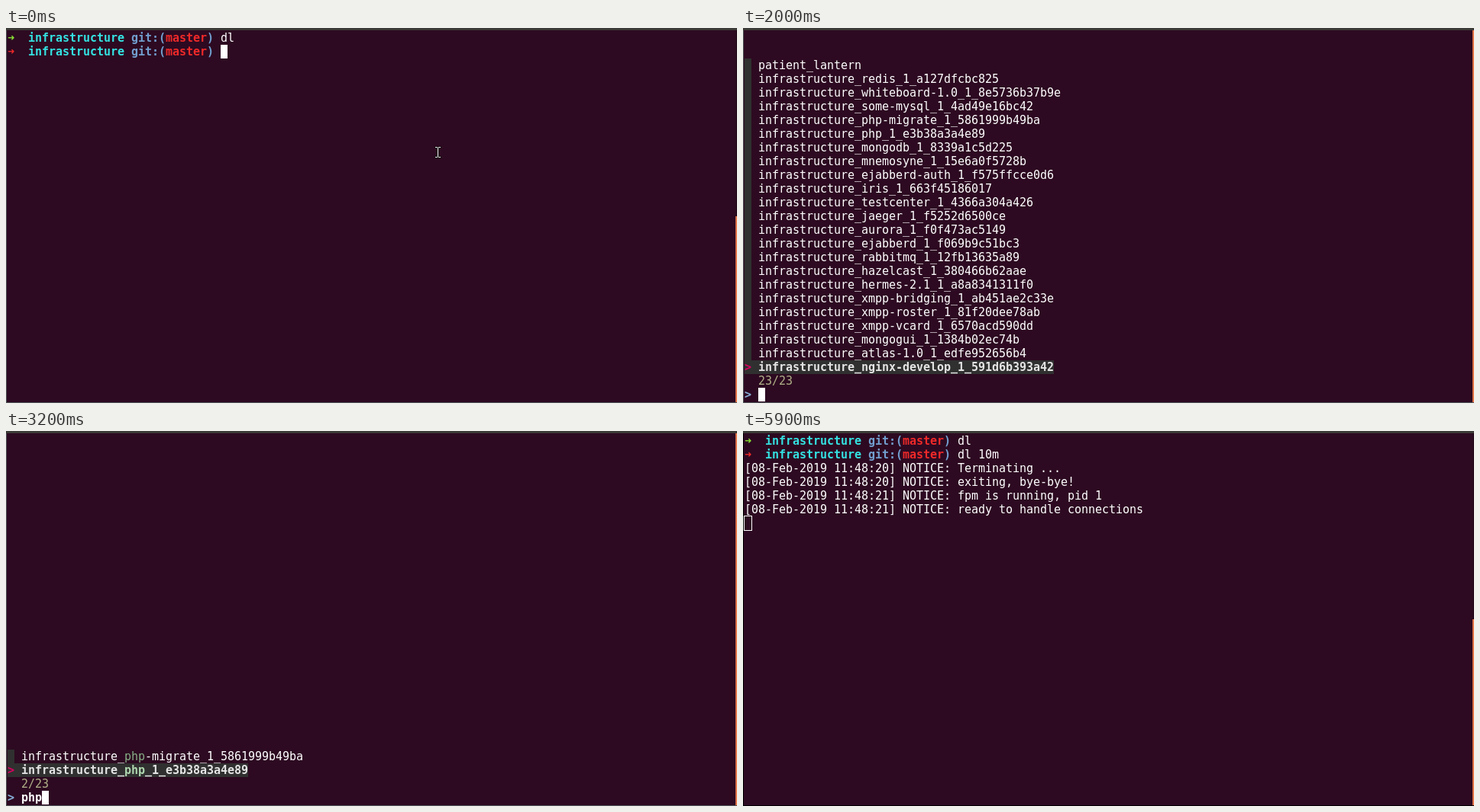
Recreate the animation shown at these times as an HTML page with a canvas. Size 957 by 492 pixels, loop 7.7 s.

```html
<!DOCTYPE html>
<html lang="en">
<head>
<meta charset="utf-8">
<title>Terminal session</title>
<style>
  html, body { margin: 0; width: 100%; height: 100%; overflow: hidden; background: #2d0a21; }
  canvas { display: block; }
</style>
</head>
<body>
<canvas id="stage" width="957" height="492"></canvas>
<script>
const ctx = document.getElementById('stage').getContext('2d');
const LOOP = 7700;
const CELL = 9, LINE = 18, LEFT = 2, TOP = 4, ASCENT = 14;
const FONT = '15px "DejaVu Sans Mono", "DejaVu Sans", monospace';
const C = {
  bg: '#2d0a21', white: '#ffffff', green: '#8ae234', red: '#ef2929', cyan: '#34e2e2',
  blue: '#729fcf', row: '#303030', marker: '#d7005f', current: '#e4e4e4',
  match: '#87af87', currentMatch: '#afd7af', info: '#afaf87', query: '#87afd7',
  strip: '#3c3b37', edge: '#50565a', bar: '#e0754a', trough: '#260a1c'
};

const PREFIX = 'infrastructure_';
const services = `redis_1_a127dfcbc825 whiteboard-1.0_1_8e5736b37b9e some-mysql_1_4ad49e16bc42
  php-migrate_1_5861999b49ba php_1_e3b38a3a4e89 mongodb_1_8339a1c5d225
  mnemosyne_1_15e6a0f5728b ejabberd-auth_1_f575ffcce0d6 iris_1_663f45186017
  testcenter_1_4366a304a426 jaeger_1_f5252d6500ce aurora_1_f0f473ac5149
  ejabberd_1_f069b9c51bc3 rabbitmq_1_12fb13635a89 hazelcast_1_380466b62aae
  hermes-2.1_1_a8a8341311f0 xmpp-bridging_1_ab451ae2c33e xmpp-roster_1_81f20dee78ab
  xmpp-vcard_1_6570acd590dd mongogui_1_1384b02ec74b atlas-1.0_1_edfe952656b4
  nginx-develop_1_591d6b393a42`.split(/\s+/);
// Best match first; the list is drawn from the bottom up.
const containers = ['patient_lantern', ...services.map(s => PREFIX + s)].reverse();

const logLines = [
  '[08-Feb-2019 11:48:20] NOTICE: Terminating ...',
  '[08-Feb-2019 11:48:20] NOTICE: exiting, bye-bye!',
  '[08-Feb-2019 11:48:21] NOTICE: fpm is running, pid 1',
  '[08-Feb-2019 11:48:21] NOTICE: ready to handle connections'
];

const commandKeys = [[900, 'd'], [1100, 'l'], [1200, ' '], [1400, '1'], [1500, '0'], [1700, 'm']];
const queryKeys = [[3000, 'p'], [3100, 'h'], [3200, 'p']];
const blinkOff = [[600, 800], [2600, 2900], [4300, 5000]];
const ENTER = 1900, LIST = 2000, LOGS = 3700, MOUSE_HIDE = 800, MOUSE_SHOW = 5000;
const BLUR = 5600, LEAVE = 5700, GONE = 5900;

const typed = (keys, t) => keys.filter(k => t >= k[0]).map(k => k[1]).join('');
const colX = col => LEFT + col * CELL;
const rowY = row => TOP + row * LINE;

function rect(x, y, w, h, color) {
  ctx.fillStyle = color;
  ctx.fillRect(x, y, w, h);
}

function text(str, col, row, color = C.white, bold = false) {
  ctx.font = (bold ? 'bold ' : '') + FONT;
  ctx.fillStyle = color;
  [...str].forEach((ch, i) => {
    if (ch !== ' ') ctx.fillText(ch, colX(col + i), rowY(row) + ASCENT);
  });
}

function prompt(row, arrow, command) {
  text('➜', 0, row, arrow, true);
  text('infrastructure', 3, row, C.cyan, true);
  text('git:(', 18, row, C.blue, true);
  text('master', 23, row, C.red, true);
  text(')', 29, row, C.blue, true);
  text(command, 31, row);
}

function cursor(col, row, t) {
  if (t >= BLUR) {
    ctx.strokeStyle = C.white;
    ctx.lineWidth = 1;
    ctx.strokeRect(colX(col) - 0.5, rowY(row) - 0.5, CELL + 1, LINE + 1);
  } else if (!blinkOff.some(([from, to]) => t >= from && t < to)) {
    rect(colX(col), rowY(row), CELL, LINE, C.white);
  }
}

function shell(t) {
  const command = typed(commandKeys, t);
  prompt(0, C.green, 'dl');
  prompt(1, C.red, command);
  if (t >= LOGS) {
    logLines.forEach((line, i) => text(line, 0, 2 + i));
    cursor(0, 6, t);
  } else if (t >= ENTER) {
    cursor(0, 2, t);
  } else {
    cursor(31 + command.length, 1, t);
  }
}

function search(query) {
  const found = containers.map(name => ({ name, at: name.indexOf(query) })).filter(m => m.at >= 0);
  if (!query) return found;
  const midWord = m => m.name[m.at - 1] === '_' ? 0 : 1;
  return found.sort((a, b) => midWord(a) - midWord(b) || a.name.length - b.name.length);
}

function picker(t) {
  const query = typed(queryKeys, t);
  const found = search(query);
  found.forEach(({ name, at }, i) => {
    const row = 24 - i, chosen = i === 0, end = at + query.length;
    rect(LEFT, rowY(row), chosen ? (name.length + 2) * CELL : CELL, LINE, C.row);
    const plain = chosen ? C.current : C.white;
    text(name.slice(0, at), 2, row, plain, chosen);
    text(name.slice(at, end), 2 + at, row, chosen ? C.currentMatch : C.match, chosen);
    text(name.slice(end), 2 + end, row, plain, chosen);
  });
  text('>', 0, 24, C.marker, true);
  text(`${found.length}/${containers.length}`, 2, 25, C.info);
  text('>', 0, 26, C.query, true);
  text(query, 2, 26, C.white, true);
  cursor(2 + query.length, 26, t);
}

function frame(t, fullBar) {
  const edge = t >= BLUR ? '#000000' : C.edge;
  rect(0, 0, 957, 3, C.strip);
  rect(0, 3, 1, 489, edge);
  rect(0, 491, 957, 1, edge);
  rect(955, 3, 2, 488, C.trough);
  const barTop = fullBar ? 3 : 247;
  rect(955, barTop, 2, 491 - barTop, C.bar);
}

function iBeam(x, y) {
  const parts = [[-3, -7, 3, 1], [1, -7, 3, 1], [0, -6, 1, 12], [-3, 6, 3, 1], [1, 6, 3, 1]];
  parts.forEach(([dx, dy, w, h]) => rect(x + dx - 0.5, y + dy - 0.5, w + 1, h + 1, '#000000'));
  parts.forEach(([dx, dy, w, h]) => rect(x + dx, y + dy, w, h, C.white));
}

function arrow(x, y) {
  ctx.beginPath();
  [[0, 0], [0, 15], [4, 12], [7, 18], [10, 17], [7, 11], [12, 11]]
    .forEach(([dx, dy]) => ctx.lineTo(x + dx, y + dy));
  ctx.closePath();
  ctx.fillStyle = '#000000';
  ctx.fill();
  ctx.strokeStyle = C.white;
  ctx.lineWidth = 1;
  ctx.stroke();
}

function mouse(t) {
  if (t < MOUSE_HIDE) return iBeam(565, 163);
  if (t < MOUSE_SHOW || t >= GONE) return;
  const step = Math.floor(t / 100) * 100;
  const p = (step - MOUSE_SHOW) / (LEAVE - MOUSE_SHOW);
  const x = Math.round(383 - 297 * p), y = Math.round(84 - 99 * p);
  if (y > 3) iBeam(x, y);
  else arrow(x, y);
}

function draw(t) {
  const listing = t >= LIST && t < LOGS;
  rect(0, 0, 957, 492, C.bg);
  frame(t, listing);
  (listing ? picker : shell)(t);
  mouse(t);
}

const start = performance.now();
function tick() {
  draw((performance.now() - start) % LOOP);
  requestAnimationFrame(tick);
}
tick();
</script>
</body>
</html>
```
